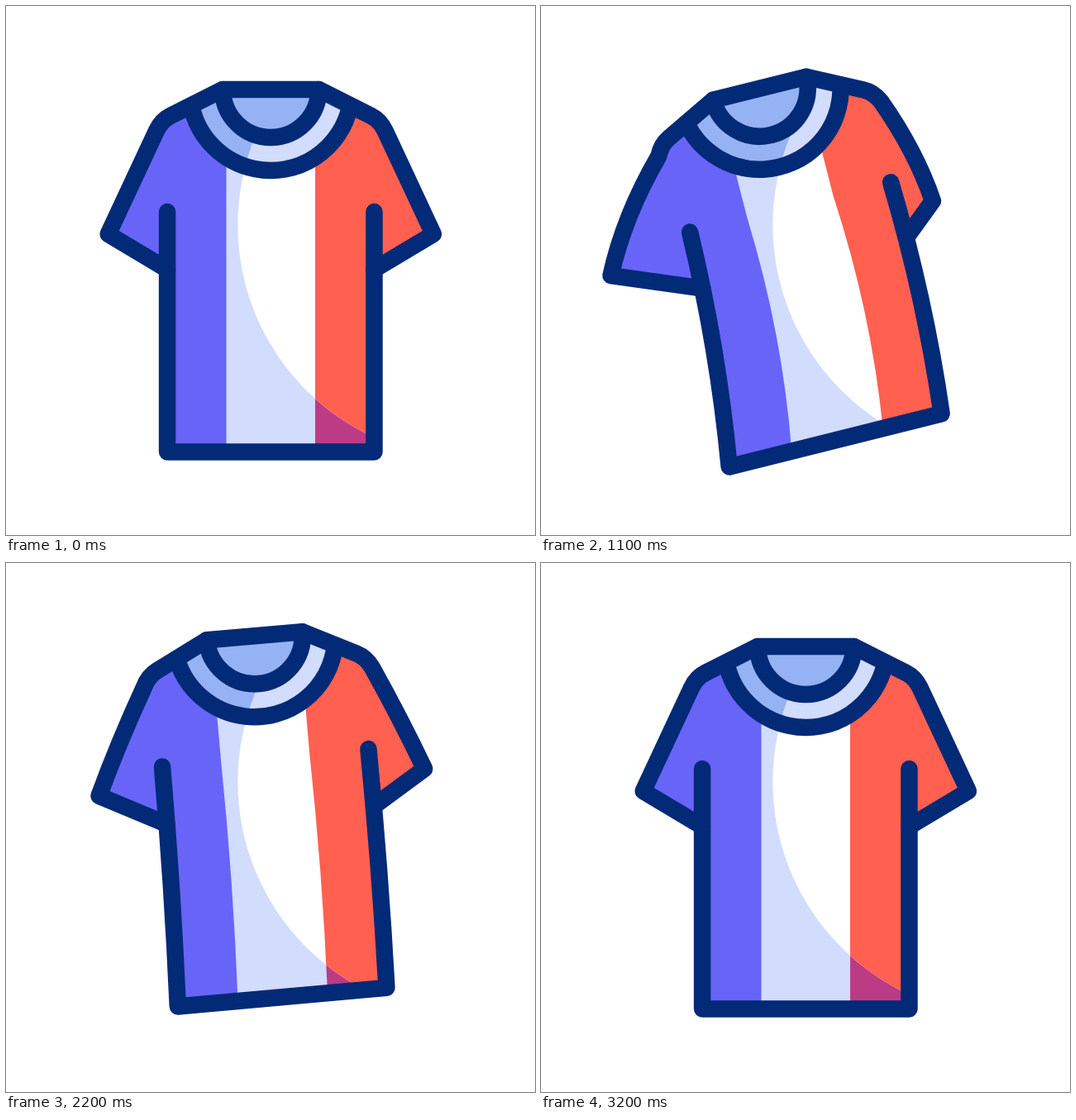
These frames come from a looping animation (640x640 px, 3600 ms). An HTML page with a canvas:

```html
<!DOCTYPE html>
<html lang="en">
<head>
<meta charset="utf-8">
<title>Swinging shirt</title>
<style>
  html, body { margin: 0; width: 100%; height: 100%; overflow: hidden; background: #fff; }
  canvas { display: block; width: 640px; height: 640px; }
</style>
</head>
<body>
<canvas id="stage"></canvas>
<script>
const LOOP = 3600, SIZE = 640, STROKE = 20.5;
const INK = '#032a76', BLUE = '#6864f8', NECK = '#95b2f4';
const SHADE = { white: '#d2dcfd', red: '#bb3b84', collar: NECK };
const LIT = { white: '#ffffff', red: '#ff6050', collar: '#d2dcfd' };
const CENTER = [320.3, 101];
const HALF = 125.2, HEM = 438.5, CHEST = 148, ARMPIT = 0.24;

// Turning points [time, value], joined by cosine easing
const LIFT = [[0, 0], [780, -46.5], [1440, 48], [2010, -40], [2440, 26], [2760, -19], [2980, 2], [3200, 0]];
const TURN = [[140, 0], [1060, -14.2], [1620, 6.8], [2170, -5], [2580, 2.1], [2980, -0.3], [3200, 0]];
const BEND = [[140, 0], [980, -15.5], [1740, 10], [2200, -4], [2480, 0]];
const SAG = [[600, 0], [1600, 4], [2400, 0]];
const SOFT = [[2000, 1], [2500, 0]];

const canvas = document.getElementById('stage');
const ctx = canvas.getContext('2d');
const ratio = window.devicePixelRatio || 1;
canvas.width = canvas.height = SIZE * ratio;
ctx.scale(ratio, ratio);
ctx.lineWidth = STROKE;
ctx.lineCap = ctx.lineJoin = 'round';

function wave(keys, t) {
  const next = keys.findIndex(k => k[0] > t);
  if (next === 0) return keys[0][1];
  if (next < 0) return keys[keys.length - 1][1];
  const [t0, v0] = keys[next - 1], [t1, v1] = keys[next];
  return v0 + (v1 - v0) * (1 - Math.cos(Math.PI * (t - t0) / (t1 - t0))) / 2;
}

const mix = (p, q, k) => [p[0] + (q[0] - p[0]) * k, p[1] + (q[1] - p[1]) * k];
const add = (p, x, y) => [p[0] + x, p[1] + y];
const move = p => ctx.moveTo(...p);
const line = (...points) => points.forEach(p => ctx.lineTo(...p));
const curve = (c, p) => ctx.quadraticCurveTo(...c, ...p);

function pose(t) {
  const turn = wave(TURN, t), bend = wave(BEND, t), sag = wave(SAG, t);
  const flare = turn * wave(SOFT, t), size = Math.abs(flare);
  const angle = turn * Math.PI / 180, cos = Math.cos(angle), sin = Math.sin(angle);
  const mid = add(CENTER, 4 * turn, wave(LIFT, t));
  const at = (x, y) => [mid[0] + x * cos - y * sin, mid[1] + x * sin + y * cos];
  const hemL = add(at(-HALF, HEM), bend - size / 2, sag);
  const hemR = add(at(HALF, HEM), bend + size / 2, -sag);

  // Vertical line of cloth at x: rigid above the chest, bent below
  const fold = x => {
    const slack = 1 - (x / HALF) ** 2;
    const top = add(at(x, CHEST), -0.1 * bend, 0);
    const end = add(mix(hemL, hemR, (x + HALF) / (2 * HALF)), -0.2 * slack * bend, 0);
    const ctrl = add(mix(top, end, 0.5), -(0.75 + 0.5 * slack) * bend, 0);
    const low = mix(ctrl, end, ARMPIT);
    return { neck: at(x, -30), top, ctrl, end, low, pit: mix(mix(top, ctrl, ARMPIT), low, ARMPIT) };
  };
  // Cuffs trail the body, and a trailing sleeve bulges outward
  const sleeve = (side, dx, dy) => {
    const arm = at(side * 138.3, 50), cuff = add(at(side * 196.7, 175), dx, dy);
    return {
      collar: at(side * 58, 0), inner: at(side * 121.5, 32), corner: at(side * 132.3, 37.5),
      arm, bend: add(mix(arm, cuff, 0.5), side * 0.4 * Math.hypot(dx, dy), 0), cuff
    };
  };
  return {
    mid, angle, hemL, hemR, fold, far: at(420, -30), farLow: at(420, 520),
    left: sleeve(-1, 2.25 * flare, -0.4 * flare + 1.8 * sag),
    right: sleeve(1, 1.7 * flare, 0.9 * size + 0.5 * sag),
    seamL: fold(-HALF), seamR: fold(HALF)
  };
}

// From the left armpit over the shoulders to the right armpit
function upper(p) {
  const { left: l, right: r } = p;
  move(p.seamL.pit);
  line(l.cuff);
  curve(l.bend, l.arm);
  curve(l.corner, l.inner);
  line(l.collar, r.collar, r.inner);
  curve(r.corner, r.arm);
  curve(r.bend, r.cuff);
  line(p.seamR.pit);
}

function body(p) {
  ctx.beginPath();
  upper(p);
  curve(p.seamR.low, p.hemR);
  line(p.hemL);
  curve(p.seamL.low, p.seamL.pit);
  ctx.closePath();
}

function fillRightOf(p, x, color) {
  const f = p.fold(x);
  ctx.beginPath();
  move(f.neck);
  line(f.top);
  curve(f.ctrl, f.end);
  line(add(f.end, 0, 60), p.farLow, p.far);
  ctx.fillStyle = color;
  ctx.fill();
}

function disc(x, y, r, color) {
  ctx.beginPath();
  ctx.arc(x, y, r, 0, Math.PI * 2);
  ctx.fillStyle = color;
  ctx.fill();
}

function cloth(p, tone) {
  fillRightOf(p, -53.75, tone.white);
  fillRightOf(p, 53.75, tone.red);
  disc(...p.mid, 98, tone.collar);
}

function collarLine(p, r, inset) {
  ctx.beginPath();
  ctx.arc(...p.mid, r, p.angle + inset, p.angle + Math.PI - inset);
  ctx.stroke();
}

function draw(t) {
  const p = pose(t);
  ctx.fillStyle = '#fff';
  ctx.fillRect(0, 0, SIZE, SIZE);

  ctx.save();
  body(p);
  ctx.clip();
  ctx.fillStyle = BLUE;
  ctx.fillRect(0, 0, SIZE, SIZE);
  cloth(p, SHADE);
  // The light stays still while the shirt moves through it
  ctx.save();
  ctx.beginPath();
  ctx.arc(563, 265, 282.6, 0, Math.PI * 2);
  ctx.clip();
  cloth(p, LIT);
  ctx.restore();
  disc(...p.mid, 58, NECK);
  ctx.restore();

  ctx.strokeStyle = INK;
  collarLine(p, 98, 0.2);
  collarLine(p, 58, 0);
  ctx.beginPath();
  upper(p);
  ctx.stroke();
  ctx.beginPath();
  move(p.seamL.top);
  curve(p.seamL.ctrl, p.hemL);
  line(p.hemR);
  curve(p.seamR.ctrl, p.seamR.top);
  ctx.stroke();
}

const start = performance.now();
function tick() {
  draw((performance.now() - start) % LOOP);
  requestAnimationFrame(tick);
}
tick();
</script>
</body>
</html>
```
